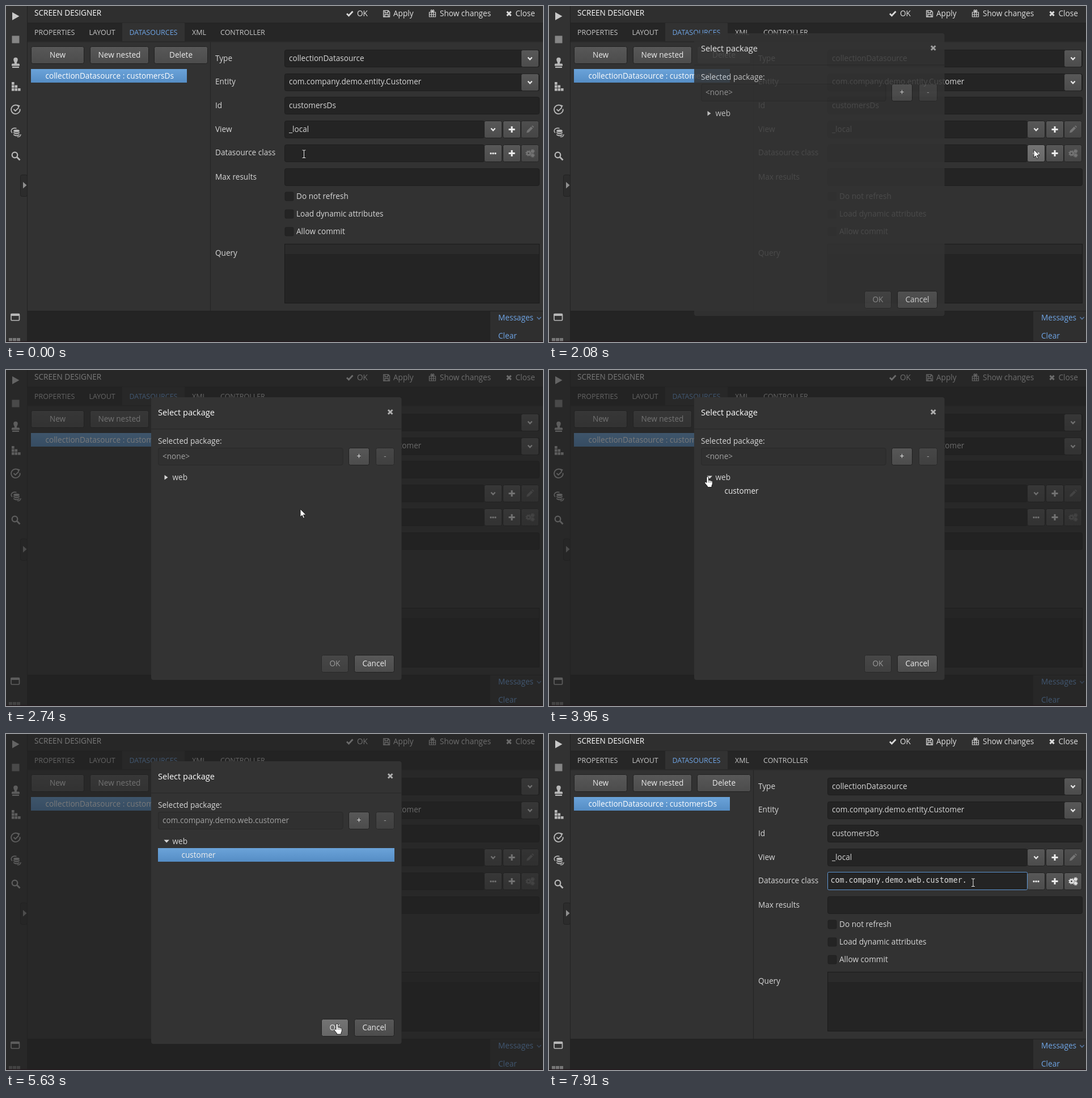
Recreate the animation shown at these times as an HTML page. Size 947 by 592 pixels, loop 8 s.

```html
<!DOCTYPE html>
<html lang="en">
<head>
<meta charset="utf-8">
<title>Screen designer</title>
<style>
html, body { margin: 0; width: 100%; height: 100%; overflow: hidden; background: #323232; }
svg { display: block; width: 947px; height: 592px; font: 13.6px "Open Sans", "Noto Sans", sans-serif; }
text { white-space: pre; }
.mono { font: 13.3px "DejaVu Sans Mono", monospace; }
</style>
</head>
<body>
<svg id="stage" viewBox="0 0 947 592" xmlns="http://www.w3.org/2000/svg"></svg>
<script>
const LOOP = 8000;
const INK = '#d6d6d6', SIDE = '#b8b8b8', BLUE = '#6fa5e6';

// Drawing helpers
const rect = (x, y, w, h, fill, extra = '') =>
  `<rect x="${x}" y="${y}" width="${w}" height="${h}" fill="${fill}" ${extra}/>`;
const text = (x, y, s, fill = INK, extra = '') =>
  `<text x="${x}" y="${y}" fill="${fill}" ${extra}>${s}</text>`;
const path = (d, fill, extra = '') => `<path d="${d}" fill="${fill}" ${extra}/>`;
const line = (d, color, width = 2, extra = '') =>
  path(d, 'none', `stroke="${color}" stroke-width="${width}" ${extra}`);
const group = (s, extra) => `<g ${extra}>${s}</g>`;
const at = (x, y, s) => group(s, `transform="translate(${x} ${y})"`);
const middle = 'text-anchor="middle"';

const field = (x, y, w, h = 31) =>
  rect(x + .5, y + .5, w - 1, h - 1, '#242424', 'rx="3" stroke="#1d1d1d"');
const face = (x, y, w, extra = '') =>
  rect(x + .5, y + .5, w - 1, 30, 'url(#btn)', `rx="3" stroke="#212121" ${extra}`);
const button = (x, y, w, label, extra) =>
  face(x, y, w, extra) + text(x + w / 2, y + 20, label, '#ececec', middle);
const check = (y, label) =>
  rect(492, y - 7, 15, 15, '#242424', 'rx="2" stroke="#202020"') + text(512, y + 5, label);

const chevron = line('M-3.6-2L0 1.8 3.6-2', '#e8e8e8', 2.2);
const plus = line('M-5.5 0H5.5M0-5.5V5.5', '#ededed', 3);
const dots = [-4, 0, 4].map(x => rect(x - 1.5, -1.3, 3, 3, '#ededed', 'rx=".8"')).join('');
const cross = (c, r = 3.8) => line(`M${-r} ${-r}L${r} ${r}M${r} ${-r}L${-r} ${r}`, c, 3);
const pencil = c => path('M-6 6L-5 2 2-5 5-2-2 5ZM3-6L4.5-7 7-4.5 6-3Z', c);
const gear = (x, y, r, c) => at(x, y,
  `<circle r="${r}" fill="none" stroke="${c}" stroke-width="2.4"/>` +
  `<circle r="${r + 1.7}" fill="none" stroke="${c}" stroke-width="1.6" stroke-dasharray="${(r + 1.7) * Math.PI / 8}"/>`);
const gears = c => gear(-2.5, 0, 2.8, c) + gear(4.6, -3.6, 1.4, c) + gear(4.6, 3.6, 1.4, c);

function sidebar() {
  return rect(0, 0, 37, 592, '#323232') + rect(37, 0, 1, 592, '#222') +
    path('M11 11L23.5 18 11 25Z', '#c8c8c8') +
    rect(10.5, 52.5, 13, 13, '#858585') +
    at(17, 100, path('M-3.8-5.5a3.8 3.8 0 0 1 7.6 0Q3.8-3.5 2.2-1L2 1.5H5.5Q7 1.5 7 3V5.5H-7V3Q-7 1.5-5.5 1.5H-2L-2.2-1Q-3.8-3.5-3.8-5.5Z', SIDE) +
      rect(-6, 6.8, 12, 2.2, SIDE)) +
    at(17, 142, [[-7, -8], [-7, -2.5], [-1.5, -2.5], [-7, 3], [-1.5, 3], [4, 3]]
      .map(([x, y]) => rect(x, y, 4.6, 4.6, SIDE)).join('')) +
    at(17, 182.5, line('M4.5-6.5A7.8 7.8 0 1 0 7.7-1', SIDE, 1.8) +
      path('M2.5-8.8L7.8-7 5-2.8Z', SIDE) + line('M-3.5-.5L-.5 2.5 5.5-3.5', SIDE, 1.9)) +
    at(17, 222.5, '<ellipse cx="1.5" cy="-2.5" rx="5.3" ry="2.3" fill="#b8b8b8"/>' +
      path('M-3.8-.8Q1.5 3 6.8-.8V1.5Q1.5 5.2-3.8 1.5ZM-3.8 3Q1.5 6.8 6.8 3V5Q1.5 9-3.8 5Z', SIDE) +
      line('M1.5-7Q-5-8.5-7.5-4Q-8.5-1-6 1M3 8Q8.5 8.5 9 3.5', SIDE, 1.5)) +
    at(17, 264, '<circle cx="-1.5" cy="-1.5" r="4.8" fill="none" stroke="#b8b8b8" stroke-width="2.2"/>' +
      line('M2.3 2.3L7.5 7.5', SIDE, 2.8)) +
    rect(25.5, 297.5, 12, 38, '#2c2c2c', 'rx="3" stroke="#222"') +
    path('M30 310L36.5 315.7 30 321.5Z', '#8f8f8f') +
    rect(9, 542.5, 14.5, 11.5, 'none', 'rx="1.5" stroke="#b8b8b8" stroke-width="1.7"') + rect(8.5, 542, 15.5, 4, SIDE) +
    [5, 12, 19].map(x => rect(x, 585, 6, 6, '#777')).join('');
}

function header() {
  return rect(38, 0, 909, 30, '#2f2f2f') + text(50, 17, 'SCREEN DESIGNER', '#fff') +
    line('M601 13.5L604.5 17 611.5 9.5', '#dadada', 2.8) + text(619, 18, 'OK', '#e0e0e0') +
    at(671, 13.5, line('M-5.3-5.3H3.2L5.5-3V5.5H-5.3ZM-2.8-5V-1.5H2.5V-5M-3 5V1.5H3.2V5', '#d6d6d6', 1.3)) +
    text(683, 18, 'Apply', '#e0e0e0') +
    at(752, 13.5, line('M-5.5-2.5H5.5V5.5H-5.5ZM-5.5 1.5H5.5M-1.7-2.5V5.5M1.8-2.5V5.5M0-3Q-4-4-2.5-6T0-3Q4-4 2.5-6T0-3', '#d2d2d2', 1.2)) +
    text(765, 18, 'Show changes', '#e0e0e0') +
    at(887, 13.5, cross('#dadada', 3.6)) + text(898.5, 18, 'Close', '#e0e0e0') +
    rect(38, 30, 909, 34, '#262626') + rect(38, 29.5, 909, 1, '#222') +
    rect(205, 30, 110, 32, '#323232') + rect(38, 62, 909, 2, '#2a2a2a') +
    group([[50, 'PROPERTIES'], [146.5, 'LAYOUT'], [217.5, 'DATASOURCES'], [328, 'XML'], [378, 'CONTROLLER']]
      .map(([x, s], i) => text(x, 51, s, i == 2 ? BLUE : '#c6c6c6')).join(''), 'font-size="12.5"');
}

function form() {
  const labels = [['Type', 97], ['Entity', 138], ['Id', 180], ['View', 222],
    ['Datasource class', 263], ['Max results', 306], ['Query', 440]];
  const icon = (x, y, art, id = '') => face(x, y, 32, id) + at(x + 16, y + 15.5, art);
  const off = 'opacity=".75"';
  return rect(360, 64, 1, 474, '#232323') +
    button(44, 71, 94, 'New') + button(148, 71, 104, 'New nested') + button(261, 71, 95, 'Delete') +
    rect(44, 111, 275, 24, 'url(#sel)') + text(69.5, 128, 'collectionDatasource : customersDs', '#fff') +
    labels.map(([s, y]) => text(369, y, s)).join('') +
    [77, 119, 160, 202, 244, 286].map((y, i) => field(491, y, i == 3 || i == 4 ? 353 : 450)).join('') +
    text(499, 97, 'collectionDatasource') + text(499, 138, 'com.company.demo.entity.Customer') +
    text(499, 180, 'customersDs') + text(499, 222, '_local') +
    icon(908, 77, chevron) + icon(908, 119, chevron) +
    icon(843, 202, chevron) + icon(876, 202, plus) + group(icon(908, 202, pencil('#8c8c8c')), off) +
    icon(843, 244, dots, 'id="more"') + icon(876, 244, plus) +
    group(icon(908, 244, gears('#8c8c8c')), off + ' id="gearOff"') +
    group(icon(908, 244, gears('#e4e4e4')), 'id="gearOn"') +
    text(496.5, 262, 'com.company.demo.web.customer.', '#dedede', 'class="mono" id="cls"') +
    rect(491.5, 243.5, 352, 31, 'none', 'rx="2" stroke="#5f97d3" id="focus"') +
    rect(737, 249, 1, 17, '#d8d8d8', 'id="caret"') +
    check(335, 'Do not refresh') + check(366, 'Load dynamic attributes') + check(397, 'Allow commit') +
    rect(491.5, 419.5, 449, 104, '#242424', 'stroke="#1b1b1b"') + rect(492, 420, 448, 17, '#2b2b2b');
}

function footer() {
  return rect(38, 537, 909, 1, '#202020') + rect(38, 538, 816, 54, '#242424') +
    rect(854, 538, 93, 54, '#2f2f2f') +
    text(868, 554, 'Messages', BLUE) + at(940, 550, line('M-3.6-2L0 1.8 3.6-2', '#5576a0', 1.6)) +
    text(868, 586, 'Clear', BLUE);
}

function dialog() {
  return rect(256, 48, 441.5, 498, '#333', 'rx="4"') + rect(256, 103.5, 441.5, 1, '#292929') +
    text(268, 80, 'Select package', '#fff', 'font-size="14.6"') + at(677.7, 74, cross('#b0b0b0')) +
    text(268, 130, 'Selected package:') +
    rect(268.5, 137.5, 325.5, 30, '#303030', 'rx="3" stroke="#292929"') +
    text(276, 157, '', '#a2a2a2', 'id="pkg"') +
    button(604, 137, 37, '+') + group(button(652, 137, 33, '-'), 'opacity=".55"') +
    path('M279.5 185L285.5 189.3 279.5 193.5Z', INK, 'id="shut"') +
    path('M278.5 186.5H288L283.2 191.5Z', INK, 'id="open"') + text(293.5, 194, 'web') +
    rect(268, 201, 417, 24, 'url(#sel)', 'id="row"') + text(309.5, 218, 'customer', '#eee', 'id="leaf"') +
    group(button(556, 502, 48, 'OK', 'id="okFace"'), 'id="ok"') + button(614, 502, 71, 'Cancel');
}

const beam = 'M-3-7H-1Q0-7 0-6Q0-7 1-7H3M0-6V5.5M-3 6.5H-1Q0 6.5 0 5.5Q0 6.5 1 6.5H3';
const cursors = {
  beam: line(beam, '#111', 2.6) + line(beam, '#eee', 1.1),
  arrow: path('M0 0V14L3.2 11 5.4 16.2 7.6 15.2 5.4 10.2H10Z', '#fff', 'stroke="#111" stroke-width=".9"'),
  hand: path('M-2 1.5a1.7 1.7 0 0 1 3.4 0V6.5A1.5 1.5 0 0 1 3.8 7 1.5 1.5 0 0 1 6.1 7.8 1.4 1.4 0 0 1 8.3 9V13L7 16V18.5H-.5V17L-5 11.5A1.5 1.5 0 0 1-3.3 9.3L-2 10.5Z',
    '#fff', 'stroke="#111" stroke-width=".9"') + line('M1.4 7V10.5M3.8 8V10.5M6.1 8.5V10.5', '#333', .7)
};

const grad = (id, a, b) => `<linearGradient id="${id}" x1="0" y1="0" x2="0" y2="1">` +
  `<stop stop-color="${a}"/><stop offset="1" stop-color="${b}"/></linearGradient>`;

const stage = document.getElementById('stage');
stage.innerHTML =
  `<defs>${grad('btn', '#585858', '#4c4c4c')}${grad('hot', '#747474', '#676767')}${grad('sel', '#6ba3d9', '#558dc5')}</defs>` +
  rect(0, 0, 947, 592, '#323232') + header() + form() + footer() + sidebar() +
  rect(0, 0, 947, 592, '#222', 'id="curtain"') + rect(0, 590.5, 947, 1.5, '#251a1f') +
  group(dialog(), 'id="dialog"') +
  group(Object.keys(cursors).map(k => group(cursors[k], `id="${k}"`)).join(''), 'id="cursor"');

const el = {};
stage.querySelectorAll('[id]').forEach(n => el[n.id] = n);
const show = (id, on) => el[id].setAttribute('visibility', on ? 'inherit' : 'hidden');
const fade = (id, v) => el[id].setAttribute('opacity', v);

// Pointer moves: first step, last step, step count, start, bend, end
const moves = [
  [430, 1210, 8, [525.5, 261], [700, 233], [855, 253]],
  [2290, 2740, 5, [855, 253], [700, 250], [519, 245]],
  [2860, 3400, 6, [519, 245], [390, 225], [280, 188]],
  [4060, 4510, 5, [280, 188], [295, 208], [321.5, 212.5]],
  [4840, 5510, 7, [321.5, 212.5], [440, 380], [584, 510.5]],
  [6490, 7050, 6, [584, 510.5], [670, 350], [748, 262]]
];

function pointer(t) {
  let pos = moves[0][3];
  for (const [from, to, n, a, b, c] of moves) {
    if (t < from) break;
    const k = Math.min(n, 1 + Math.floor((t - from) / ((to - from) / (n - 1)) + 1e-6));
    const u = k / n, e = u * u * (3 - 2 * u);
    pos = [0, 1].map(i => (1 - e) ** 2 * a[i] + 2 * e * (1 - e) * b[i] + e * e * c[i]);
  }
  return pos;
}

function shape(t, x, y) {
  const within = (l, top, r, b) => x > l && x < r && y > top && y < b;
  if (t < 1210) return x < 843 ? 'beam' : 'arrow';
  if (t < 1310) return 'arrow';
  if (t < 1960) return 'hand';
  if (t < 6380) {
    if (t >= 5630 || within(268, 201, 685, 225) && t >= 3950) return 'hand';
    return t >= 3400 && t < 4060 ? 'hand' : 'arrow';
  }
  if (t < 6490) return 'hand';
  return within(491, 419, 941, 524) || within(491, 286, 941, 317) || within(491, 244, 844, 274) ? 'beam' : 'arrow';
}

// Value held from each step time until the next
const held = (t, steps) => steps.reduce((v, [from, next]) => t >= from ? next : v, 0);
const dialogSteps = [[1960, .2], [2080, .86], [2180, 1], [6380, .02], [6490, 0]];
const curtainSteps = [[2180, .18], [2290, .36], [2400, .5], [2510, .57], [2630, .6], [6380, 0]];
const rowSteps = [[4730, .74], [4840, 1]];

function draw(t) {
  const [x, y] = pointer(t), kind = shape(t, x, y);
  el.cursor.setAttribute('transform', `translate(${x} ${y})`);
  for (const k in cursors) show(k, k == kind);

  const alpha = held(t, dialogSteps);
  fade('dialog', alpha);
  show('dialog', alpha > 0);
  el.dialog.setAttribute('transform', t >= 6380 ? 'translate(477 297) scale(.8) translate(-477 -297)' : '');
  fade('curtain', held(t, curtainSteps));

  const opened = t >= 3950, picked = t >= 4730, closed = t >= 6380;
  show('shut', !opened);
  show('open', opened);
  show('leaf', opened);
  fade('row', held(t, rowSteps));
  fade('ok', picked ? 1 : .55);
  el.pkg.textContent = picked ? 'com.company.demo.web.customer' : '<none>';
  el.okFace.setAttribute('fill', t >= 5510 ? 'url(#hot)' : 'url(#btn)');
  el.more.setAttribute('fill', t >= 1210 && t < 2290 ? 'url(#hot)' : 'url(#btn)');

  show('cls', closed);
  show('gearOn', closed);
  show('gearOff', !closed);
  show('focus', t >= 7380);
  show('caret', t >= 7380 && t < 7910);
}

const start = performance.now();
function tick() {
  draw((performance.now() - start) % LOOP);
  requestAnimationFrame(tick);
}
draw(0);
requestAnimationFrame(tick);
</script>
</body>
</html>
```
